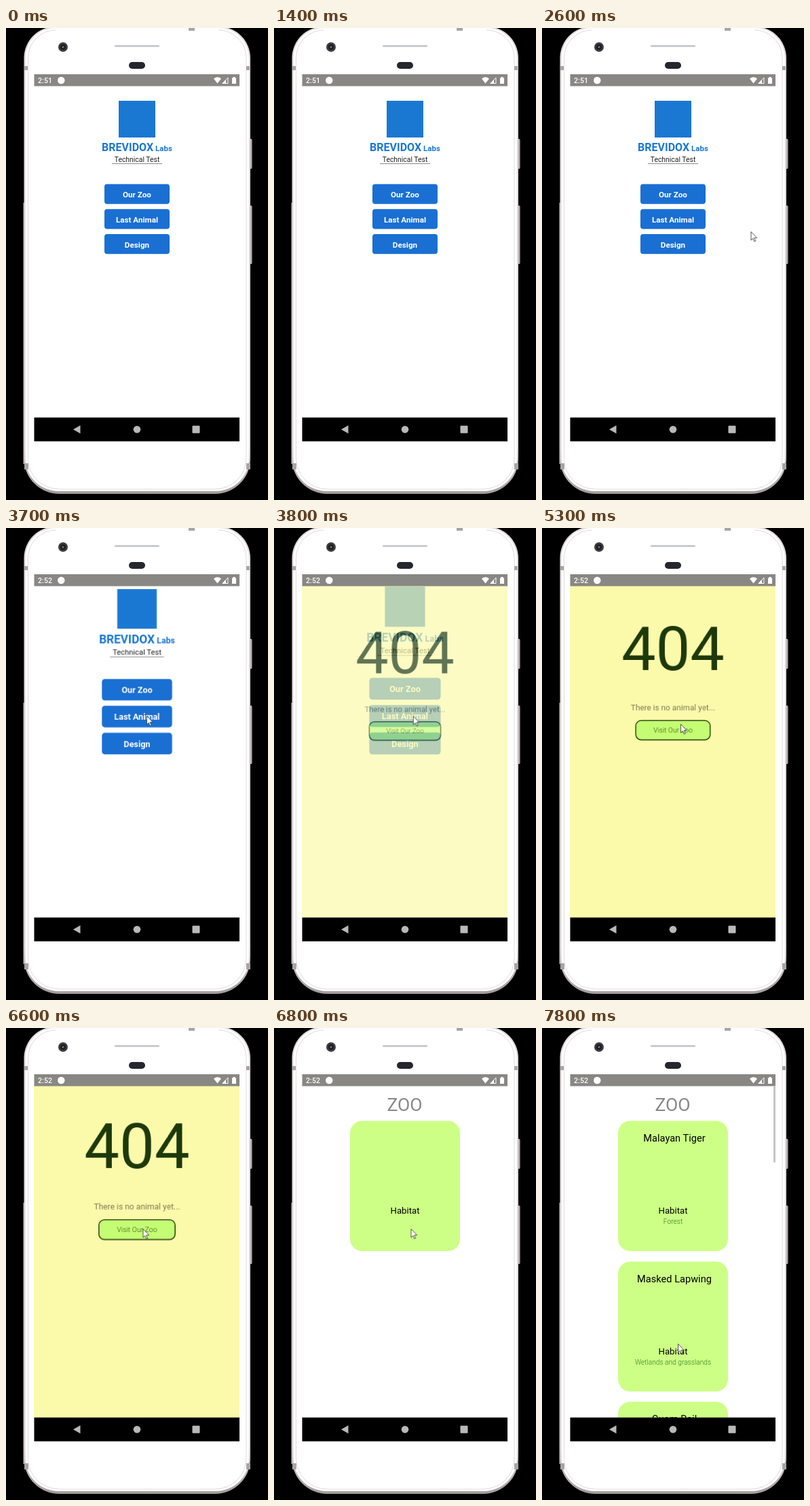
Animation of 386x694 px, one loop 8 s. Source, as an HTML page:

```html
<!DOCTYPE html>
<html lang="en">
<head>
<meta charset="utf-8">
<title>Zoo app demo</title>
<style>
  html, body { margin: 0; width: 100%; height: 100%; overflow: hidden; background: #000; }
  svg { display: block; width: 386px; height: 694px; }
  text { font-family: Roboto, sans-serif; text-anchor: middle; }

  .anim { animation: 8s step-end -10ms infinite; }
  .screen { transform-origin: 193px 327px; }
  #home { animation-name: home; }
  #missing { animation-name: missing; }
  #zoo { animation-name: zoo; }
  #loaded { animation-name: loaded; }
  #before { animation-name: before; }
  #after { animation-name: after; }
  #cursor { animation-name: cursor; }

  .btn rect { fill: #1a6fd3; }
  .btn text { fill: #fff; font-size: 11.7px; font-weight: 700; }
  .name { font-size: 14.6px; }
  .label { font-size: 13.2px; }
  .place { font-size: 10.2px; font-weight: 300; fill: #2f7d1c; }
  .card { fill: #cdff87; }

  @keyframes home {
    0% { opacity: 1; transform: none; }
    45% { opacity: 1; transform: scale(1.025); }
    46.25% { opacity: 1; transform: scale(1.078); }
    47.5% { opacity: 1; transform: scale(1.095); }
    48.75%, 100% { opacity: 0; transform: none; }
  }
  @keyframes missing {
    0% { opacity: 0; transform: none; }
    47.5% { opacity: .7; transform: scale(.96); }
    48.75% { opacity: 1; transform: none; }
    82.5% { opacity: 1; transform: scale(1.025); }
    83.75% { opacity: 1; transform: scale(1.078); }
    85%, 100% { opacity: 0; transform: none; }
  }
  @keyframes zoo {
    0% { opacity: 0; transform: none; }
    83.75% { opacity: .6; transform: scale(.96); }
    85%, 100% { opacity: 1; transform: none; }
  }
  @keyframes loaded { 0% { opacity: 0; } 95%, 100% { opacity: 1; } }
  @keyframes before { 0% { opacity: 1; } 36.25%, 100% { opacity: 0; } }
  @keyframes after { 0% { opacity: 0; } 36.25%, 100% { opacity: 1; } }
  @keyframes cursor {
    0% { opacity: 0; transform: translate(307.5px, 299px); }
    32.5% { opacity: 1; transform: translate(307.5px, 299px); animation-timing-function: steps(7); }
    41.25%, 46.25% { opacity: 1; transform: translate(207px, 276px); animation-timing-function: steps(2); }
    48.75%, 56.25% { opacity: 1; transform: translate(202.5px, 276.5px); animation-timing-function: steps(8); }
    66.25% { opacity: 1; transform: translate(204px, 288px); animation-timing-function: steps(5); }
    72.5%, 86.25% { opacity: 1; transform: translate(201.5px, 295px); animation-timing-function: steps(5); }
    92.5%, 100% { opacity: 1; transform: translate(200px, 464px); }
  }
</style>
</head>
<body>
<svg viewBox="0 0 386 694">
  <defs>
    <clipPath id="view"><rect x="41.5" y="85" width="302.5" height="488"/></clipPath>
    <linearGradient id="rim" x2="0" y2="1">
      <stop offset=".9" stop-color="#ded7d8"/>
      <stop offset="1" stop-color="#a39c9d"/>
    </linearGradient>
  </defs>
  <rect width="386" height="694" fill="#000"/>

  <!-- phone body -->
  <g fill="#b5aeae">
    <rect x="359" y="163" width="3.5" height="44" rx="1.5"/>
    <rect x="359" y="261" width="3.5" height="86" rx="1.5"/>
    <rect x="25.500" y="257" width="2" height="384"/>
  </g>
  <path d="M26.500 44A46 46 0 0 1 72.500 -2H314A46 46 0 0 1 360 44V633A52 52 0 0 1 308 685H78.500A52 52 0 0 1 26.500 633Z" fill="url(#rim)"/>
  <path d="M28.500 44A44 44 0 0 1 72.500 0H314A44 44 0 0 1 358 44V633A49 48 0 0 1 309 681H77.500A49 48 0 0 1 28.500 633Z" fill="#fff"/>
  <path d="M32.500 44A41 41 0 0 1 73.500 3M313 3A41 41 0 0 1 354 44V633A46 45 0 0 1 308 678H78.500A46 45 0 0 1 32.500 633V44" fill="none" stroke="#e0dadb"/>
  <g fill="#a9a4a5">
    <rect x="27" y="56" width="5" height="6"/><rect x="354" y="56" width="5" height="6"/>
    <rect x="27" y="640" width="6" height="9"/><rect x="354" y="640" width="6" height="9"/>
    <rect x="269" y="0" width="9" height="4"/>
  </g>
  <rect x="160" y="25" width="66" height="3" rx="1.5" fill="#c9cbd0"/>
  <circle cx="84" cy="28" r="7" fill="#3b3b3f"/>
  <circle cx="84" cy="28" r="4" fill="#1b1b20"/>
  <circle cx="84" cy="28" r="1.5" fill="#777780"/>
  <rect x="181" y="50" width="24" height="10" rx="5" fill="#25262e"/>

  <!-- app screens -->
  <rect x="41.5" y="85" width="302.5" height="488" fill="#fff"/>
  <g clip-path="url(#view)">
    <g id="home" class="anim screen">
      <rect x="166" y="107" width="54" height="54" fill="#1b78d2"/>
      <text x="193" y="181" font-size="16" font-weight="700" fill="#1b78d2">BREVIDOX <tspan font-size="11.5" dx="-1">Labs</tspan></text>
      <text x="193" y="196.5" font-size="10.4" fill="#222">Technical Test</text>
      <path d="M156 199.5H230" stroke="#888"/>
      <g class="btn"><rect x="145" y="229.5" width="96" height="29.3" rx="4"/><text x="193" y="248.5">Our Zoo</text></g>
      <g class="btn"><rect x="145" y="266.2" width="96" height="29.3" rx="4"/><text x="193" y="285.5">Last Animal</text></g>
      <g class="btn"><rect x="145" y="303" width="96" height="29.3" rx="4"/><text x="193" y="322.5">Design</text></g>
    </g>

    <g id="missing" class="anim screen">
      <rect x="0" y="40" width="386" height="580" fill="#fbf9aa"/>
      <text x="193" y="209" font-size="90" fill="#1d390b">404</text>
      <text x="193" y="268.3" font-size="11.8" fill="#7c7b55">There is no animal yet...</text>
      <rect x="138.2" y="283" width="109.6" height="28.5" rx="8" fill="#c4fc73" stroke="#2b4712" stroke-width="1.5"/>
      <text x="193" y="301" font-size="10.2" font-weight="300" fill="#31570f">Visit Our Zoo</text>
    </g>

    <g id="zoo" class="anim screen">
      <rect x="0" y="40" width="386" height="580" fill="#fff"/>
      <text x="192.5" y="121.8" font-size="26.6" fill="#888">ZOO</text>
      <rect class="card" x="112" y="136.5" width="162" height="191.5" rx="18"/>
      <text class="label" x="193" y="273">Habitat</text>
      <g id="loaded" class="anim">
        <text class="name" x="195" y="167">Malayan Tiger</text>
        <text class="place" x="193" y="288">Forest</text>
        <rect class="card" x="112" y="343.5" width="162" height="191" rx="18"/>
        <text class="name" x="195" y="373.5">Masked Lapwing</text>
        <text class="label" x="193" y="480">Habitat</text>
        <text class="place" x="193" y="495">Wetlands and grasslands</text>
        <rect class="card" x="112" y="549.5" width="162" height="191" rx="18"/>
        <text class="name" x="195" y="580">Guam Rail</text>
        <rect x="341" y="86" width="3" height="111.5" fill="#c6c6c6"/>
      </g>
    </g>
  </g>

  <!-- status bar -->
  <rect x="41.5" y="68" width="302.5" height="17.5" fill="#888783"/>
  <g fill="#fff">
    <g font-size="10.6" font-weight="500">
      <text id="before" class="anim" x="57.5" y="81">2:51</text>
      <text id="after" class="anim" x="57.5" y="81">2:52</text>
    </g>
    <circle cx="81.3" cy="77" r="5.3"/>
    <path d="M306 74.5Q311.5 70 317 74.5L311.5 81.5Z"/>
    <path d="M319 81.5L327 73V81.5Z" fill="none" stroke="#fff"/>
    <path d="M318.5 82L324 76V82Z"/>
    <path d="M333 73.5H334.5V72H337.5V73.5H339V82H333Z"/>
  </g>

  <!-- navigation bar -->
  <rect x="41.5" y="572.7" width="302.5" height="35" fill="#000"/>
  <g fill="#b9b9b9">
    <path d="M99 590.2L109.5 584.2V596.2Z"/>
    <circle cx="193" cy="590.2" r="5.3"/>
    <rect x="274.5" y="584.7" width="11" height="11" rx="1"/>
  </g>

  <g id="cursor" class="anim">
    <path d="M.5 .5V13L3.4 10.3L5.3 15L7.2 14.2L5.3 9.6H9.2Z" fill="#fff" stroke="#444" stroke-width=".9"/>
  </g>
</svg>
</body>
</html>
```
